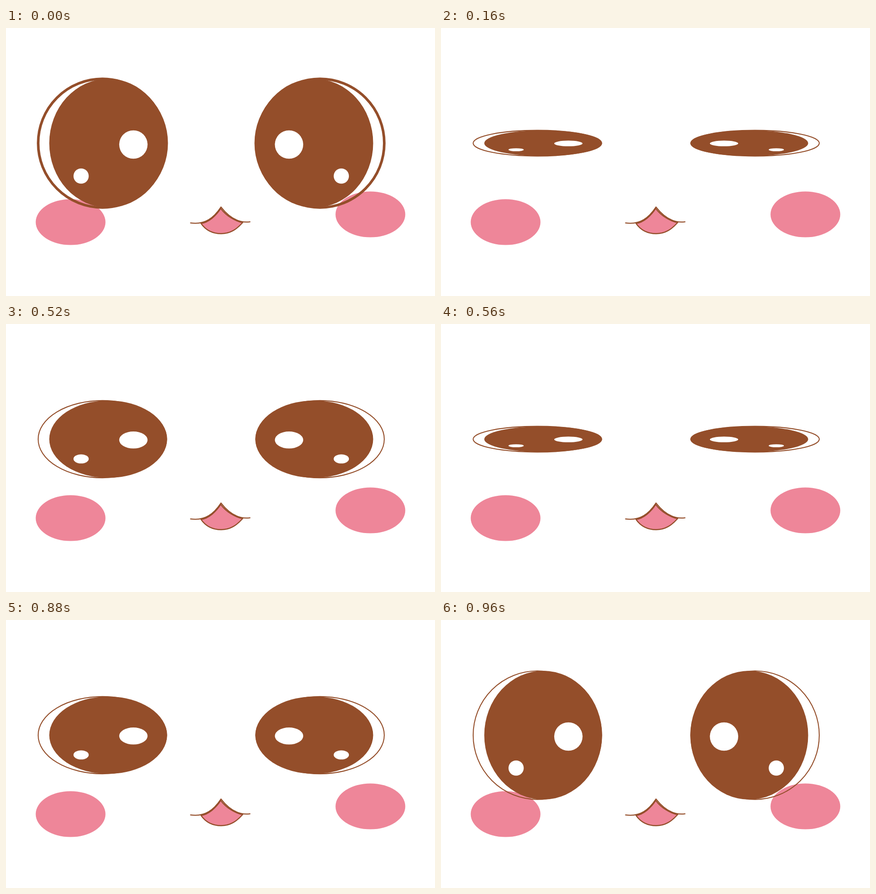
Write an HTML page that moves like this. It is 947x591 px and loops after 1.16 s.

```html
<!DOCTYPE html>
<html lang="en">
<head>
<meta charset="utf-8">
<title>Blinking face</title>
<style>
  html, body { margin: 0; width: 100%; height: 100%; overflow: hidden; background: #fff; }
  svg { display: block; width: 100%; height: 100%; }
</style>
</head>
<body>
<svg viewBox="0 0 947 591">
  <g fill="#ee8699">
    <ellipse cx="142.6" cy="428" rx="77" ry="50.5"/>
    <ellipse cx="804.4" cy="411" rx="77" ry="50.5"/>
  </g>
  <g stroke="#944e2a" stroke-width="2.3" stroke-linejoin="round" stroke-linecap="round">
    <path fill="#ee8699" d="M430.5 431C447 429 464 414 474 398C486 414 505 426 522.5 429C509 444 495 453.5 475 453.5C457 453.5 441 446 430.5 431Z"/>
    <path fill="none" d="M407.5 429.8C440 434.5 459 418 474.5 394.8C491 416 512 431 538.5 427.3"/>
  </g>
  <g id="left"></g>
  <g id="right" transform="translate(906 0) scale(-1 1)"></g>
</svg>
<script>
const LOOP = 1160, STEP = 40, EYE_Y = 254;
const BROWN = '#944e2a';
const BLINKS = [80, 480, 840];   // last fully open moment before each blink
const CLOSE_TIME = 80, SHUT = 0.2;

// The right eye mirrors the left one.
const PARTS = [
  { cx: 212.8, cy: 254, rx: 141.8, ry: 141.8, fill: 'none', stroke: BROWN },
  { cx: 225.5, cy: 254, rx: 130, ry: 142, fill: BROWN },
  { cx: 281.2, cy: 257, rx: 31.3, ry: 31.3, fill: '#fff' },
  { cx: 165.8, cy: 326.5, rx: 16.8, ry: 16.8, fill: '#fff' }
];

function addEllipse(parent, attrs) {
  const el = document.createElementNS('http://www.w3.org/2000/svg', 'ellipse');
  for (const name in attrs) el.setAttribute(name, attrs[name]);
  return parent.appendChild(el);
}

const eyes = ['left', 'right'].map(id =>
  PARTS.map(part => addEllipse(document.getElementById(id), part)));

// Lids close evenly, then spring open at once.
function openness(t) {
  for (const start of BLINKS) {
    const p = (t - start) / CLOSE_TIME;
    if (p >= 0 && p <= 1) return 1 - (1 - SHUT) * p;
  }
  return 1;
}

function draw(time) {
  const t = Math.floor((time % LOOP) / STEP) * STEP;
  const open = openness(t);
  for (const eye of eyes) {
    eye.forEach((el, i) => {
      const { cy, ry } = PARTS[i];
      el.setAttribute('cy', EYE_Y + (cy - EYE_Y) * open);
      el.setAttribute('ry', ry * open);
    });
    eye[0].setAttribute('stroke-width', t < BLINKS[0] ? 5.8 : 2.1);
  }
}

const begin = performance.now();
function tick(now) {
  draw(Math.max(0, now - begin));
  requestAnimationFrame(tick);
}
draw(0);
requestAnimationFrame(tick);
</script>
</body>
</html>
```
